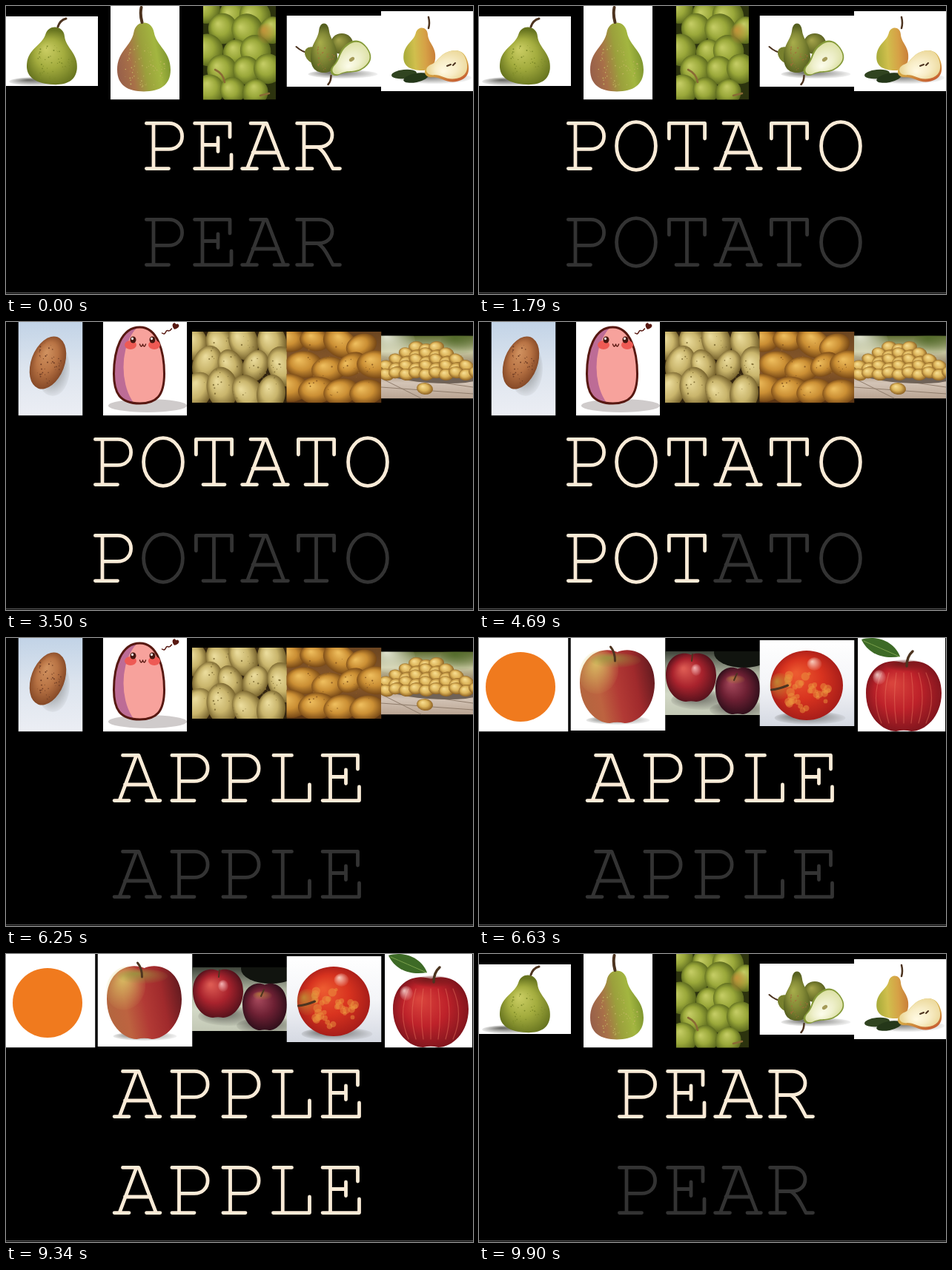
Recreate the animation shown at these times as an HTML page with a canvas. Size 630 by 389 pixels, loop 9.97 s.

```html
<!DOCTYPE html>
<html lang="en">
<head>
<meta charset="utf-8">
<title>Spelling game</title>
<style>
html, body { margin: 0; width: 100%; height: 100%; overflow: hidden; background: #000; }
canvas { display: block; }
</style>
</head>
<body>
<canvas id="stage" width="630" height="389" role="img" aria-label="Spelling game: PEAR, POTATO, APPLE"></canvas>
<script>
const ctx = document.getElementById('stage').getContext('2d');
const LOOP = 9970, PITCH = 69, WEIGHT = 4.8, CENTER = 315, SLOT = 127.5;
const CREAM = '#faebd7', DIM = '#333';

// Slab letters as centre lines between TOP and BASE
const TOP = 2.4, BASE = 63.6;
const bar = (y, a, b) => `M${a} ${y}H${b}`;
const post = (x, a = TOP, b = BASE) => `M${x} ${a}V${b}`;
const bowl = (x, edge, y) => {
  const mid = (TOP + y) / 2, k = (y - TOP) * .28, turn = edge - 18;
  return `M${x} ${TOP}H${turn}C${turn + 11} ${TOP} ${edge} ${mid - k} ${edge} ${mid}` +
    `C${edge} ${mid + k} ${turn + 11} ${y} ${turn} ${y}H${x}`;
};
const GLYPHS = {
  P: bar(TOP, 12.4, 22) + bowl(22, 60.6, 37.4) + post(22) + bar(BASE, 12.4, 42.5),
  E: bar(TOP, 8.6, 56) + post(56, TOP, 21) + post(19) + bar(31.5, 19, 40) + post(40, 22, 40.5) +
     bar(BASE, 8.6, 58) + post(58, 45),
  A: bar(TOP, 15, 36.5) + `L60 ${BASE}M33.5 ${TOP}L10.5 ${BASE}` + bar(42, 18, 52) +
     bar(BASE, 3.6, 23.5) + bar(BASE, 47, 65.4),
  R: bar(TOP, 8.6, 18) + bowl(18, 56, 34.5) + post(18) + bar(BASE, 8.6, 29) +
     `M36 34.5C44 38 50 50 57 ${BASE}H66.5`,
  O: 'M8.6 33A26.4 32.3 0 1 1 61.4 33A26.4 32.3 0 1 1 8.6 33Z',
  T: bar(TOP, 10.4, 58.6) + post(10.4, TOP, 23) + post(58.6, TOP, 23) + post(34.5) + bar(BASE, 20, 49),
  L: bar(TOP, 11.5, 36) + post(23.8) + bar(BASE, 11, 60) + post(60, 42)
};

// Unit outlines
const DISC = 'M-1 0A1 1 0 1 1 1 0A1 1 0 1 1 -1 0Z';
const PEAR = 'M-.38 -.9C-.3 -1.32 .3 -1.32 .38 -.9C.48 -.45 1 -.3 1 .3C1 .8 .6 1 0 1C-.6 1 -1 .8 -1 .3C-1 -.3 -.48 -.45 -.38 -.9Z';
const APPLE = 'M0 -.92C.4 -1.1 1 -.85 1 -.08C1 .6 .55 1 .2 1Q0 .95 -.2 1C-.55 1 -1 .6 -1 -.08C-1 -.85 -.4 -1.1 0 -.92Z';

function random(seed) {
  return () => (seed = seed * 16807 % 2147483647) / 2147483647;
}

function stops(gradient, colors) {
  colors.forEach((c, i) => gradient.addColorStop(i / (colors.length - 1), c));
  return gradient;
}
const glow = (...colors) => stops(ctx.createRadialGradient(-.3, -.35, .05, 0, 0, 1.1), colors);
const across = (...colors) => stops(ctx.createLinearGradient(-1, .2, 1, -.2), colors);
const down = (h, ...colors) => stops(ctx.createLinearGradient(0, -h / 2, 0, h / 2), colors);
const soft = rgb => glow(`rgba(${rgb},.8)`, `rgba(${rgb},0)`);

function form(path, x, y, rx, ry, turn, style) {
  ctx.save();
  ctx.translate(x, y);
  ctx.rotate(turn);
  ctx.scale(rx, ry);
  ctx.fillStyle = style;
  ctx.fill(new Path2D(path));
  ctx.restore();
}
const blob = (x, y, rx, ry, style, turn = 0) => form(DISC, x, y, rx, ry, turn, style);
const shadow = (x, y, rx, ry) => blob(x, y, rx, ry, soft('70,70,65'));

function line(d, width, color) {
  ctx.lineWidth = width;
  ctx.strokeStyle = color;
  ctx.lineCap = ctx.lineJoin = 'round';
  ctx.stroke(new Path2D(d));
}

function mottle(x, y, rx, ry, count, color, size = 1) {
  const rnd = random(7);
  for (let i = 0; i < count; i++) {
    const a = rnd() * 7, r = Math.sqrt(rnd()), s = size * (.5 + rnd());
    blob(x + Math.cos(a) * r * rx, y + Math.sin(a) * r * ry, s, s, color);
  }
}

// Loose grid of overlapping fruit
function pile(w, h, cols, rows, rx, ry, seed, style) {
  const rnd = random(seed), jitter = size => (rnd() - .5) * size;
  for (let r = 0; r < rows; r++) {
    for (let c = 0; c < cols; c++) {
      const x = ((c + .25 + r % 2 / 2) / cols - .5) * w + jitter(8);
      const y = ((r + .5) / rows - .5) * h + jitter(10);
      const s = .9 + rnd() * .3;
      blob(x, y, rx * s, ry * s, style, jitter(1.2));
    }
  }
}

// A picture centred in its slot, drawn around its own middle
function photo(w, h, bg, draw) {
  return slot => {
    ctx.save();
    ctx.translate(CENTER + (slot - 2) * SLOT, 61);
    ctx.beginPath();
    ctx.rect(-w / 2, -h / 2, w, h);
    ctx.clip();
    ctx.fillStyle = Array.isArray(bg) ? down(h, ...bg) : bg;
    ctx.fillRect(-w / 2, -h / 2, w, h);
    draw(w, h);
    ctx.restore();
  };
}

const STEM = '#4d3420';

const pears = [
  photo(128, 94, '#fff', () => {
    shadow(-18, 41, 38, 6);
    form(PEAR, 3, 10, 34, 35, .1, glow('#c9cc62', '#a3ac3e', '#67741f'));
    mottle(3, 16, 28, 25, 60, '#7f8c2a', .7);
    line('M10 -33Q13 -42 21 -44', 3, STEM);
  }),
  photo(93, 131, '#fff', () => {
    form(PEAR, -1.5, 12.5, 36, 42, 0, across('#98604a', '#a87048', '#9ba03c', '#a3b640', '#78902c'));
    mottle(-2, 20, 30, 30, 80, '#c0b460', .6);
    line('M-4 -39Q-7 -50 -5 -59', 4, STEM);
  }),
  photo(98, 131, '#2c330e', (w, h) => {
    pile(w, h, 3, 5, 18, 19, 31, glow('#c3cb63', '#9aa83a', '#4f5d18'));
    blob(36, -24, 12, 14, soft('205,145,60'));
    line('M-33 25Q-22 30 -20 42M28 60L40 57', 2.5, '#8a6a35');
  }),
  photo(128, 96, '#fff', () => {
    shadow(12, 31, 47, 6);
    line('M-51 -6Q-42 2 -32 3', 2, STEM);
    blob(-27, 6, 14, 10, '#77802d', .7);
    blob(10.5, -10, 15, 14, glow('#a3a24a', '#7c8132', '#555c20'));
    form(PEAR, -13.5, -1, 18, 30, 0, glow('#a6ab4a', '#858b37', '#566020'));
    mottle(-13, 8, 14, 18, 35, '#a66b3a', .6);
    form(PEAR, 23, 11, 20, 27, -2.2, '#859a38');
    form(PEAR, 23.5, 11, 18, 25, -2.2, glow('#fbfbe8', '#eff0cd', '#dce0a5'));
    blob(24, 11, 4, 2.5, '#a59b58', -.6);
    line('M-4 33Q-4 41 -8 45', 2.5, STEM);
  }),
  photo(128, 108, '#fff', () => {
    shadow(8, 36, 50, 8);
    form(PEAR, -11.5, 0, 21.5, 26, .1, across('#a8ab3a', '#d0bf4d', '#d6a146', '#c77a38'));
    line('M0 -31Q2 -38 0 -46', 2.5, STEM);
    blob(-33, 31, 17, 6, '#304420', -.1);
    blob(-17, 36, 17, 6, '#243719', -.2);
    form(PEAR, 27, 22, 21, 27, -1.8, across('#c75f32', '#d4a443', '#d8c456'));
    form(PEAR, 27, 20, 19, 25, -1.8, glow('#fff9e1', '#f8edc7', '#ecd99c'));
    line('M25 20L30 18M36 16L33 19', 2, STEM);
  })
];

const TATER = ['#eadb9b', '#c9b56c', '#65511f'];
const GOLD = ['#edbc5c', '#cb8f34', '#6a3d11'];

const potatoes = [
  photo(87, 131, ['#c0d2e6', '#dce4ee', '#eceef4'], () => {
    shadow(3, 2, 23, 37);
    blob(-3.5, -6, 22.5, 37, glow('#cf905e', '#b87344', '#7d4222'), .36);
    mottle(-3, -6, 18, 29, 45, '#6e3c24', .7);
  }),
  photo(113, 131, '#fff', () => {
    const egg = 'M-7 -54C17 -54 26 -21 26 9C26 39 15 49 -7 49C-34 49 -42 35 -42 9C-42 -23 -32 -54 -7 -54Z';
    blob(3.5, 52, 53, 9, '#cfcbcb');
    form(egg, 0, 0, 1, 1, 0, '#bd6c96');
    ctx.save();
    ctx.clip(new Path2D(egg));
    blob(8, 0, 37, 62, '#f7a29c');
    ctx.restore();
    line(egg, 3, '#571811');
    for (const side of [-1, 1]) {
      blob(-3.5 + side * 16, -30, 8, 6, '#ee5a54');
      blob(-3 + side * 13, -37, 4, 4.5, '#451711');
      blob(-4 + side * 13, -38.5, 1.5, 1.7, '#fff');
    }
    line('M-7 -31Q-5 -25 -3 -31Q-1 -25 1 -31', 1.4, '#571811');
    line('M23 -46C29 -42 27 -52 32 -49Q34 -49 36 -52', 1.5, '#571811');
    form('M0 5C-8 0 -2 -6 0 -2C3 -6 9 0 0 5Z', 41, -56, 1, 1, .3, '#571811');
  }),
  photo(128, 96, '#32240f', (w, h) => {
    pile(w, h, 4, 3, 18, 24, 12, glow(...TATER));
    mottle(0, 0, 58, 44, 60, '#8a783e', .8);
  }),
  photo(128, 96, ['#6b4520', '#8a5a2c', '#593413'], (w, h) => {
    pile(w, h, 4, 3, 22, 16, 23, glow(...GOLD));
    mottle(0, 0, 55, 40, 40, '#916025', .8);
  }),
  photo(128, 85, ['#5f6d33', '#c9c9a2', '#8d755c', '#d3c4b6', '#b9a492'], () => {
    blob(-48, -35, 30, 22, soft('255,255,245'));
    blob(44, -34, 28, 16, soft('80,105,40'));
    line('M-64 27L60 36M-64 15L-10 42M-10 17L60 27', 1, '#8f7c6b');
    blob(0, 7, 72, 14, '#6f6257', .08);
    const style = glow('#f7dd90', '#dcb45a', '#805318');
    for (let row = 0; row < 5; row++) {
      const count = 3 + row * 2;
      for (let i = 0; i < count; i++) {
        const x = -3 + (i - (count - 1) / 2) * 13.5;
        blob(x, -27 + row * 8.5 + i % 2 * 3, 10.5, 8, style, Math.sin(i * 3 + row) * .4);
      }
    }
    blob(-5, 29, 11, 8, style, .1);
  })
];

const apples = [
  photo(121, 131, '#fff', () => blob(-4, 5, 47, 47, '#f07a1e')),
  photo(128, 128, '#fff', () => {
    shadow(0, 50, 43, 6);
    form(APPLE, -1, 4, 50.5, 50, 0, across('#b3663f', '#bd6340', '#b23a35', '#a02a2c', '#651b20'));
    blob(-26, -15, 26, 30, soft('222,205,105'), .4);
    blob(-3, -31, 34, 10, soft('150,150,62'));
    line('M-4 -30Q-4 -42 -10 -49', 3, STEM);
  }),
  photo(128, 86, ['#3e443a', '#a9af9c', '#d2d8c6', '#c3c8b5'], () => {
    blob(42, -41, 40, 20, '#11140f');
    shadow(-14, 23, 42, 13);
    shadow(38, 36, 42, 12);
    form(APPLE, -29, -8, 34, 33, 0, glow('#dc5a52', '#a9232d', '#4d101a'));
    form(APPLE, 34, 10, 30, 32, 0, glow('#a4475a', '#6d2033', '#2a0d18'));
    blob(31, -5, 13, 6, soft('180,125,60'));
    blob(-22, -18, 7, 8, soft('255,205,205'));
    line('M-28 -30L-27 -39M29 -4L33 -13', 2, STEM);
  }),
  photo(128, 116, ['#fff', '#f4f5f8', '#d5d9e2'], () => {
    shadow(4, 47, 48, 9);
    blob(-.5, 3, 49, 47, glow('#ec5a30', '#d8331f', '#a01a18'));
    mottle(-4, 10, 34, 28, 36, 'rgba(236,150,62,.5)', 4);
    blob(-36, 4, 15, 18, soft('190,150,55'));
    line('M-48 9Q-38 8 -26 3', 3, STEM);
    blob(10, -26, 10, 9, soft('255,235,220'));
  }),
  photo(118, 131, '#fff', () => {
    form(APPLE, 3, 17, 51, 48, 0, glow('#d9433c', '#be222a', '#7b141c'));
    blob(6, -24, 26, 8, soft('110,25,25'));
    for (let i = -3; i <= 3; i++) {
      line(`M${3 + i * 10} -14Q${3 + i * 15} 20 ${3 + i * 10} 54`, 1.2, 'rgba(232,120,95,.45)');
    }
    blob(-30, -8, 9, 10, soft('255,225,220'));
    line('M7 -23Q7 -36 15 -43', 3.5, STEM);
    form('M-54 -59C-38 -64 -12 -60 -2 -36C-24 -32 -45 -39 -54 -59Z', 0, 0, 1, 1, 0, '#3d6a26');
    line('M-51 -57Q-30 -48 -3 -36', 1, '#7ba14c');
  })
];

// [start, word, key times]
const rounds = [
  [0, 'PEAR', [180, 720, 1180, 1650]],
  [1790, 'POTATO', [3500, 4060, 4690, 5130, 5710, 6170]],
  [6250, 'APPLE', [7560, 8020, 8480, 8890, 9340]],
  [9490, 'PEAR', []]
];

// [start, pictures]
const galleries = [
  [0, pears],
  [2190, potatoes.slice(0, 1)],
  [2260, potatoes],
  [6630, apples],
  [9900, pears]
];

const current = (list, t) => list.filter(e => e[0] <= t).pop();

function spell(word, y, lit) {
  const left = CENTER - word.length * PITCH / 2;
  [...word].forEach((ch, i) => {
    ctx.save();
    ctx.translate(left + i * PITCH, y);
    line(GLYPHS[ch], WEIGHT, i < lit ? CREAM : DIM);
    ctx.restore();
  });
}

const start = performance.now();
let shown = '';

function frame() {
  const t = (performance.now() - start) % LOOP;
  const [, word, keys] = current(rounds, t);
  const [since, pictures] = current(galleries, t);
  const typed = keys.filter(k => k <= t).length;
  const state = [word, typed, since].join();
  if (state !== shown) {
    shown = state;
    ctx.fillStyle = '#000';
    ctx.fillRect(0, 0, 630, 389);
    pictures.forEach((draw, slot) => draw(slot));
    spell(word, 156, word.length);
    spell(word, 286, typed);
    ctx.fillStyle = '#666';
    ctx.fillRect(0, 387, 630, 1);
  }
  requestAnimationFrame(frame);
}
frame();
</script>
</body>
</html>
```
